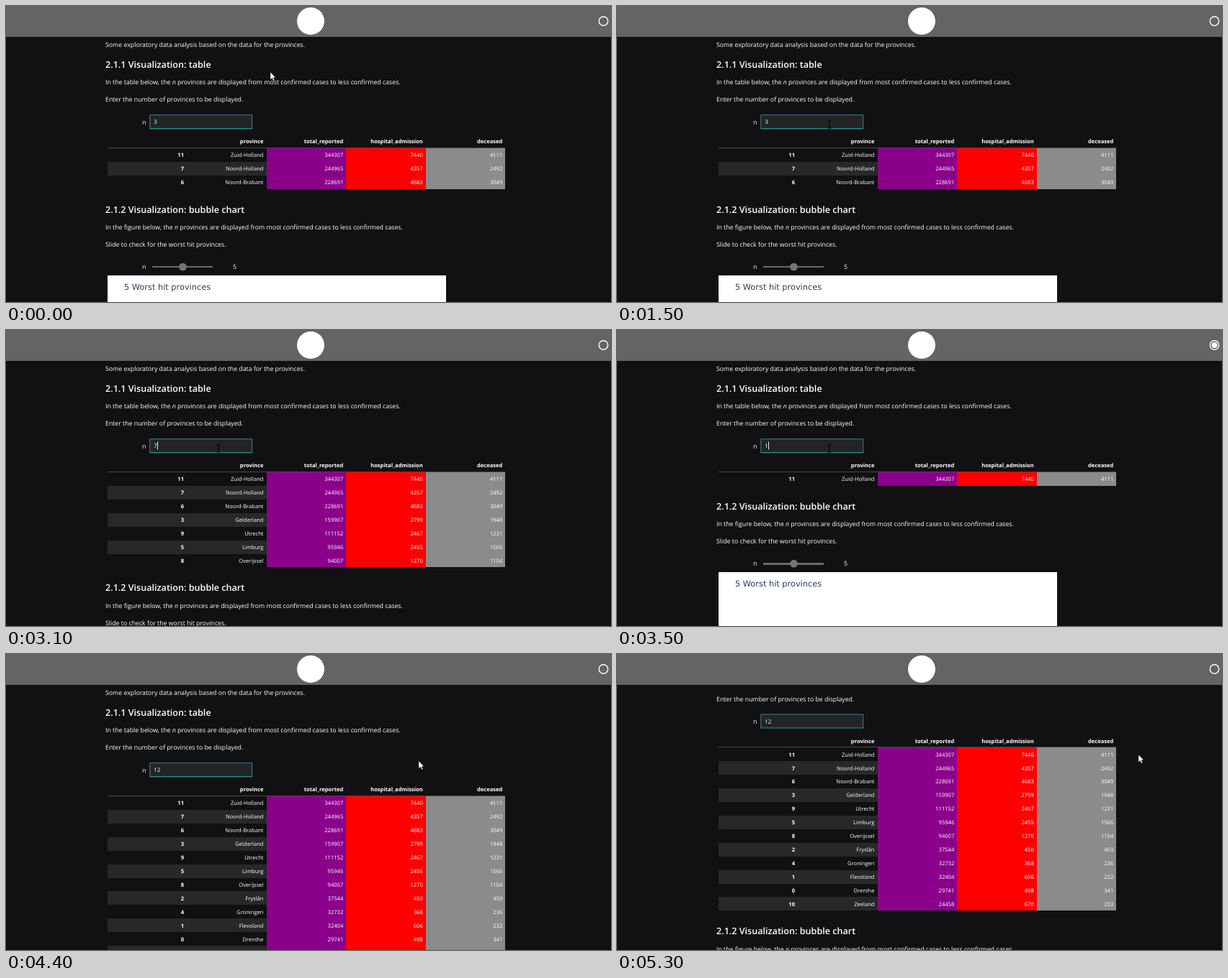
Animation of 840x412 px, one loop 5400 ms. Source, as an HTML page:

```html
<!DOCTYPE html>
<html lang="en">
<head>
<meta charset="utf-8">
<title>Province explorer</title>
<style>
  html, body { margin: 0; width: 100%; height: 100%; overflow: hidden; background: #111013; }
  svg { display: block; width: 840px; height: 412px; }
  text {
    font: 500 8.78px "Open Sans", "Noto Sans", sans-serif;
    fill: #fff;
    white-space: pre;
    text-rendering: geometricPrecision;
  }
  rect { shape-rendering: crispEdges; }
  .head { font-size: 12.6px; font-weight: 600; }
  .cell { font-size: 7.6px; }
  .value { font-size: 7.9px; }
  .bold { font-weight: 700; }
  .end { text-anchor: end; }
  .chart { font: 11.35px "DejaVu Sans", sans-serif; fill: #2a3f5f; }
  .mono { font: 600 8.02px "Noto Sans Mono", "DejaVu Sans Mono", monospace; }
  .r { fill: #c2282e; }
  .g { fill: #0c8232; }
  .c { fill: #60c6c8; }
  .b { fill: #2a86ea; }
  .w { fill: #f8f4f2; }
</style>
</head>
<body>
<svg id="stage" viewBox="0 0 840 412">
  <g id="page">
    <g id="intro"></g>
    <rect x="200" y="152" width="142" height="19" fill="#242427"/>
    <path d="M199.8 171V151.7H341.7V171" fill="none" stroke="#3f7f9c"/>
    <path d="M199.5 170.7H342" stroke="#1a9c94" stroke-width="1.2"/>
    <text id="value" class="value" x="205.3" y="164.3"></text>
    <path id="caret" stroke="#fff" stroke-width=".9"/>
    <g id="table"></g>
    <g id="error"></g>
    <g id="bubble"></g>
  </g>
  <rect width="840" height="42.5" fill="#646365"/>
  <circle cx="423" cy="21" r="19" fill="#fff"/>
  <circle cx="829.5" cy="21" r="6.2" fill="none" stroke="#fff" stroke-width="1.4"/>
  <circle id="busy" cx="829.5" cy="21" r="4" fill="#fff"/>
  <path id="arrow" d="M0 0V10.6L2.5 8.4L4.2 12.2L5.9 11.4L4.2 7.7H7.4Z" fill="#fff" stroke="#111" stroke-width=".5"/>
  <path id="beam" d="M-2.5 -5H2.5M0 -5V5M-2.5 5H2.5" fill="none" stroke="#000" stroke-width="1.2"/>
</svg>
<script>
const LOOP = 5400, STEP = 100;
const TOP = 198, ROW = 18.92, ERROR_END = 365;
const $ = id => document.getElementById(id);
const text = (x, y, s, cls = '') => `<text x="${x}" y="${y}" class="${cls}">${s}</text>`;
const rect = (x, y, w, h, fill) => `<rect x="${x}" y="${y}" width="${w}" height="${h}" fill="${fill}"/>`;
const italicN = '<tspan font-style="italic">n</tspan>';
const sorted = place =>
  `In the ${place} below, the ${italicN} provinces are displayed from most confirmed cases to less confirmed cases.`;

$('intro').innerHTML =
  text(138, 57, 'Some exploratory data analysis based on the data for the provinces.') +
  text(138, 85.5, '2.1.1 Visualization: table', 'head') +
  text(138, 109, sorted('table')) +
  text(138, 133.3, 'Enter the number of provinces to be displayed.') +
  text(189, 164.5, 'n');

// Positions are relative to the end of the output above
$('bubble').innerHTML =
  text(138, 33, '2.1.2 Visualization: bubble chart', 'head') +
  text(138, 56.3, sorted('figure')) +
  text(138, 80.5, 'Slide to check for the worst hit provinces.') +
  text(189, 111.5, 'n') +
  rect(203, 107, 84, 2.6, '#6a6a6a') +
  '<circle cx="245.5" cy="108.3" r="5.4" fill="#747474"/>' +
  text(315, 111.5, '5') +
  rect(140.5, 120, 470, 400, '#fff') +
  text(164, 140.5, '5 Worst hit provinces', 'chart');

const provinces = `11 Zuid-Holland 344307 7440 4111
7 Noord-Holland 244965 4357 2492
6 Noord-Brabant 228691 4683 3049
3 Gelderland 159907 2799 1948
9 Utrecht 111152 2467 1231
5 Limburg 95946 2455 1566
8 Overijssel 94007 1270 1104
2 Fryslân 37544 450 459
4 Groningen 32732 368 236
1 Flevoland 32404 606 232
0 Drenthe 29741 498 341
10 Zeeland 24458 670 233`.split('\n').map(line => line.split(' '));
const rights = [247, 357.5, 468.3, 578.8, 689.3];
const titles = ['', 'province', 'total_reported', 'hospital_admission', 'deceased'];

const tableRow = (cells, i) => {
  const y = TOP + i * ROW;
  const labels = cells.map((s, k) => text(rights[k], y + 12.3, s, k ? 'cell end' : 'cell end bold'));
  return '<g class="row">' +
    (i % 2 ? rect(140.5, y, 221, ROW, '#28282a') : '') +
    rect(361.5, y, 110.5, ROW, '#8b008b') +
    rect(472, y, 110.7, ROW, '#f00') +
    rect(582.7, y, 110.5, ROW, '#8b8b8d') +
    labels.join('') + '</g>';
};
$('table').innerHTML =
  titles.map((s, k) => text(rights[k], 191.3, s, 'cell end bold')).join('') +
  rect(140.5, 197, 552.7, .8, '#4a4a4c') +
  provinces.map(tableRow).join('');
const rows = [...document.querySelectorAll('.row')];

// Each run starts with its colour letter
const pad = n => ' '.repeat(n);
const trace = [
  'r' + '-'.repeat(75),
  `rValueError|w${pad(32)}Traceback (most recent call last)`,
  'g~\\AppData\\Local\\Continuum\\anaconda3\\lib\\site-packages\\ipywidgets\\widgets\\interaction.py|w in |cupdate|b(self, *args)',
  `g    254|w${pad(21)}value = widget.get_interact_value()`,
  `g    255|w${pad(21)}self.kwargs[widget._kwarg] = value`,
  `g--&gt; 256|w${pad(17)}self.result = self.f(**self.kwargs)`,
  `g    257|w${pad(17)}show_inline_matplotlib_plots()`,
  `g    258${pad(17)}if|w self.auto_display |gand|w self.result |gis not None|w:`,
  'w',
  'g&lt;ipython-input-18-f96a898cfea5&gt;|w in |cshow_latest_cases|b(n)',
  'g     12',
  'g     13 def|w show_latest_cases(n):',
  'g---&gt; 14|w     n = int(n)',
  "g     15     return|w prov_covid.sort_values(|b'total_reported'|w, ascending= |gFalse|w).head(n).style.apply(highlight_col, axis",
  'w=|gNone|w)',
  'g     16',
  'w',
  "rValueError|w: invalid literal for int() with base 10: ''"
];
const runs = line => line.split('|').map(s => `<tspan class="${s[0]}">${s.slice(1)}</tspan>`).join('');
$('error').innerHTML = rect(140.5, 178.3, 566.5, 189.7, '#5a1e1e') +
  trace.map((line, i) => text(144, 190 + i * 10.33, runs(line), 'mono')).join('');

// [start, field value, rows (0 is the traceback), busy time]
const states = [
  [0, '3', 3, 0], [2300, '', 0, 200], [2900, '7', 7, 100],
  [3300, '', 0, 200], [3500, '1', 1, 100], [3700, '12', 12, 100]
];
const CLICK = 1700, BLUR = 4200;
// [time, x, y] of the pointer
const pointer = [[0, 367, 92], [400, 367, 92], [1200, 295, 165], [4100, 295, 165], [4600, 724, 140], [LOOP, 724, 140]];

const ease = p => p * p * (3 - 2 * p);
const ramp = (t, a, b) => ease(Math.min(1, Math.max(0, (t - a) / (b - a))));
const show = (el, on) => { el.style.display = on ? '' : 'none'; };

function movePointer(t) {
  const i = pointer.findIndex(p => p[0] > t);
  const [ta, xa, ya] = pointer[i - 1], [tb, xb, yb] = pointer[i];
  const p = ramp(t, ta, tb), x = xa + (xb - xa) * p, y = ya + (yb - ya) * p;
  const inField = x > 200 && x < 342 && y > 151 && y < 171;
  show($('arrow'), !inField);
  show($('beam'), inField);
  $(inField ? 'beam' : 'arrow').setAttribute('transform', `translate(${x} ${y})`);
}

function draw(t) {
  const [start, value, count, busy] = states.filter(s => s[0] <= t).pop();
  $('value').textContent = value;
  const blinkOn = (t - Math.max(start, CLICK)) % 1000 < 500;
  show($('caret'), t >= CLICK && t < BLUR && blinkOn);
  $('caret').setAttribute('d', `M${206 + value.length * 4.5} 155.5V166.5`);

  show($('table'), count);
  show($('error'), !count);
  rows.forEach((row, i) => show(row, i < count));
  const end = count ? TOP + count * ROW : ERROR_END;
  $('bubble').setAttribute('transform', `translate(0 ${end})`);

  const scroll = 67.7 * ramp(t, 4750, 5050);
  $('page').setAttribute('transform', `translate(0 ${-scroll})`);
  show($('busy'), t - start < busy);
  movePointer(t);
}

const began = performance.now();
function tick() {
  const t = (performance.now() - began) % LOOP;
  draw(Math.floor(t / STEP) * STEP);
  requestAnimationFrame(tick);
}
tick();
</script>
</body>
</html>
```
